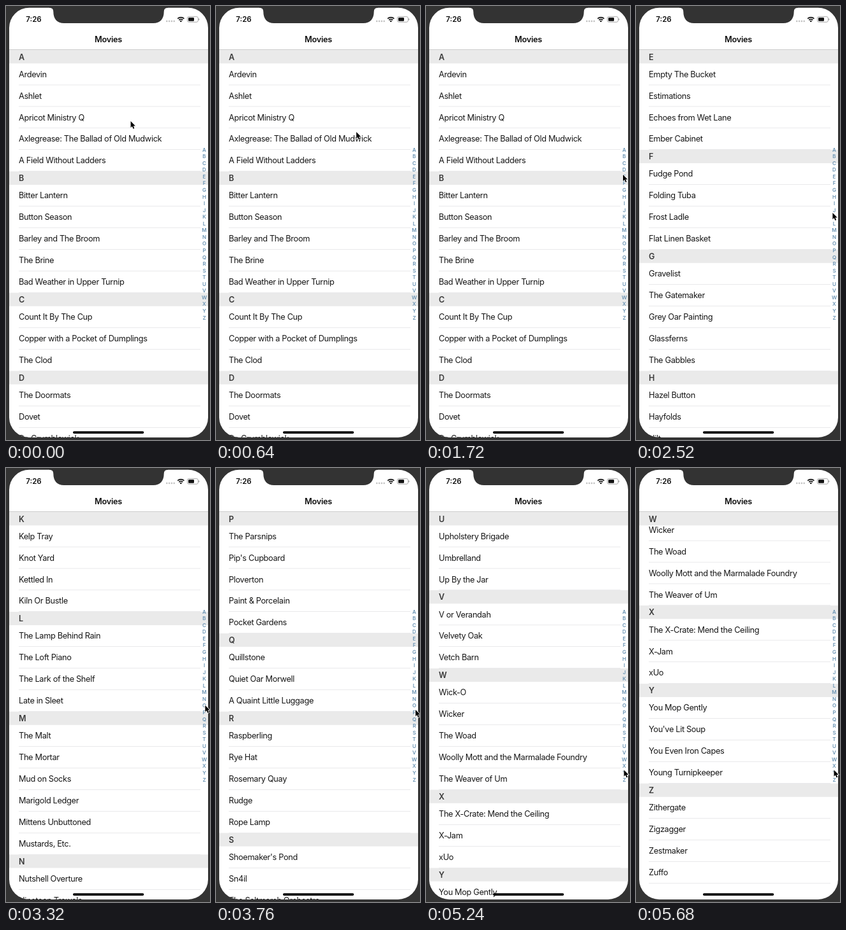
These frames come from a looping animation (320x682 px, 5.72 s). An HTML page with a canvas:

```html
<!DOCTYPE html>
<html lang="en">
<head>
<meta charset="utf-8">
<title>Movies</title>
<style>
  html, body { margin: 0; width: 100%; height: 100%; overflow: hidden; background: #333; }
  canvas { display: block; width: 320px; height: 682px; }
</style>
</head>
<body>
<canvas id="stage"></canvas>
<script>
const W = 320, H = 682, LOOP = 5720, STEP = 40;
const LEFT = 5, RIGHT = 317, CEIL = 2.7, BOTTOM = 678;
const TOP = 69.2, HEAD = 21.1, ROW = 33.92;
const FONT = 'Inter, "Liberation Sans", sans-serif';

const movies = `
A|Ardevin|Ashlet|Apricot Ministry Q|Axlegrease: The Ballad of Old Mudwick|A Field Without Ladders
B|Bitter Lantern|Button Season|Barley and The Broom|The Brine|Bad Weather in Upper Turnip
C|Count It By The Cup|Copper with a Pocket of Dumplings|The Clod
D|The Doormats|Dovet|Dr. Crumblewick
E|Empty The Bucket|Estimations|Echoes from Wet Lane|Ember Cabinet
F|Fudge Pond|Folding Tuba|Frost Ladle|Flat Linen Basket
G|Gravelist|The Gatemaker|Grey Oar Painting|Glassferns|The Gabbles
H|Hazel Button|Hayfolds|Hilt
K|Kelp Tray|Knot Yard|Kettled In|Kiln Or Bustle
L|The Lamp Behind Rain|The Loft Piano|The Lark of the Shelf|Late in Sleet
M|The Malt|The Mortar|Mud on Socks|Marigold Ledger|Mittens Unbuttoned|Mustards, Etc.
N|Nutshell Overture|Nineteen Trowels
P|The Parsnips|Pip's Cupboard|Ploverton|Paint & Porcelain|Pocket Gardens
Q|Quillstone|Quiet Oar Morwell|A Quaint Little Luggage
R|Raspberling|Rye Hat|Rosemary Quay|Rudge|Rope Lamp
S|Shoemaker's Pond|Sn4il|The Saltmarsh Orchestra
U|Upholstery Brigade|Umbrelland|Up By the Jar
V|V or Verandah|Velvety Oak|Vetch Barn
W|Wick-O|Wicker|The Woad|Woolly Mott and the Marmalade Foundry|The Weaver of Um
X|The X-Crate: Mend the Ceiling|X-Jam|xUo
Y|You Mop Gently|You've Lit Soup|You Even Iron Capes|Young Turnipkeeper
Z|Zithergate|Zigzagger|Zestmaker|Zuffo`;

let total = 0;
const sections = movies.trim().split('\n').map(line => {
  const [letter, ...rows] = line.split('|');
  const s = { letter, rows, top: total };
  total += HEAD + rows.length * ROW;
  s.end = total;
  return s;
});
const maxScroll = total - 583.3;

// Index taps: [time, letter]
const taps = [[0, 'A'], [1760, 'E'], [2640, 'K'], [3720, 'P'], [4600, 'U'], [5320, 'Y']];

// Pointer moves: [start, end, x, y]
const start = [195.6, 181];
const moves = [
  [420, 1120, 300.4, 254], [1120, 1480, 309, 265], [2080, 2500, 308.4, 325],
  [3040, 3400, 313, 380], [4080, 4480, 312.6, 432.5], [4690, 5030, 310.5, 474.5]
];

const canvas = document.getElementById('stage');
const ctx = canvas.getContext('2d');
const dpr = window.devicePixelRatio || 1;
canvas.width = W * dpr;
canvas.height = H * dpr;

function rect(color, x, y, w, h) {
  ctx.fillStyle = color;
  ctx.fillRect(x, y, w, h);
}

function pill(color, x, y, w, h, r) {
  ctx.fillStyle = color;
  ctx.beginPath();
  ctx.roundRect(x, y, w, h, r);
  ctx.fill();
}

function text(str, x, y, size, weight, color, align = 'left', spacing = 0) {
  ctx.font = `${weight} ${size}px ${FONT}`;
  ctx.letterSpacing = spacing + 'px';
  ctx.textAlign = align;
  ctx.fillStyle = color;
  ctx.fillText(str, x, y);
}

function scrollAt(t) {
  const letter = taps.filter(tap => tap[0] <= t).pop()[1];
  return Math.min(sections.find(s => s.letter === letter).top, maxScroll);
}

function pointerAt(t) {
  let [x, y] = start;
  for (const [from, to, mx, my] of moves) {
    const u = Math.min(1, Math.max(0, (t - from) / (to - from)));
    const e = u * u * (3 - 2 * u);
    x += (mx - x) * e;
    y += (my - y) * e;
  }
  return [x, y];
}

function drawList(scroll) {
  ctx.save();
  ctx.beginPath();
  ctx.rect(0, TOP, W, H - TOP);
  ctx.clip();
  const visible = sections.filter(s => s.end > scroll && s.top < scroll + H - TOP);
  for (const s of visible) {
    s.rows.forEach((title, i) => {
      const y = TOP + s.top - scroll + HEAD + i * ROW;
      text(title, 20, y + 21.4, 12.8, 400, '#181818', 'left', -0.36);
      rect('#c8c8cc', 20, y + ROW - 0.4, 285, 0.4);
    });
  }
  // The current header sticks to the top
  for (const s of visible) {
    const y = TOP + Math.min(Math.max(s.top - scroll, 0), s.end - scroll - HEAD);
    rect('#eaeaea', LEFT, y, RIGHT - LEFT, HEAD);
    text(s.letter, 20, y + 15.3, 12.5, 600, '#3a3a3a');
  }
  ctx.restore();
}

function drawIndex() {
  for (let i = 0; i < 26; i++) {
    text(String.fromCharCode(65 + i), 311, 228.6 + i * 10.56, 8, 600, '#6993b3', 'center');
  }
}

function drawStatus() {
  text('7:26', 43.5, 25.2, 11.5, 600, '#111', 'center');
  for (let i = 0; i < 4; i++) pill('#c4c4c4', 251 + i * 3.8, 22.6, 2.6, 2.6, 1.3);

  ctx.strokeStyle = '#111';
  ctx.lineWidth = 1.7;
  for (const r of [4.2, 7.2]) {
    ctx.beginPath();
    ctx.arc(274.3, 25, r, -Math.PI * 0.75, -Math.PI * 0.25);
    ctx.stroke();
  }
  ctx.fillStyle = '#111';
  ctx.beginPath();
  ctx.moveTo(274.3, 25.4);
  ctx.arc(274.3, 25.4, 2.6, -Math.PI * 0.75, -Math.PI * 0.25);
  ctx.fill();

  ctx.strokeStyle = '#a0a0a0';
  ctx.lineWidth = 0.9;
  ctx.beginPath();
  ctx.roundRect(284.5, 16.7, 16.8, 8.6, 2.4);
  ctx.stroke();
  pill('#111', 286, 18.2, 9, 5.6, 1.2);
  pill('#a0a0a0', 302, 19.6, 1.2, 2.8, 0.6);
}

function drawNotch() {
  ctx.fillStyle = '#333';
  ctx.beginPath();
  ctx.moveTo(68, 0);
  ctx.lineTo(68, CEIL);
  ctx.quadraticCurveTo(74.3, CEIL, 74.3, 9);
  ctx.bezierCurveTo(74.3, 20, 80, 27, 91, 27);
  ctx.lineTo(231, 27);
  ctx.bezierCurveTo(242, 27, 247.7, 20, 247.7, 9);
  ctx.quadraticCurveTo(247.7, CEIL, 254, CEIL);
  ctx.lineTo(254, 0);
  ctx.fill();
}

function drawPointer(x, y) {
  ctx.save();
  ctx.translate(x, y);
  ctx.beginPath();
  [[0, 0], [0, 10.2], [2.3, 8.1], [4, 12], [5.8, 11.2], [4.1, 7.4], [7.3, 7.4]]
    .forEach(p => ctx.lineTo(...p));
  ctx.closePath();
  ctx.lineJoin = 'round';
  ctx.lineWidth = 1.5;
  ctx.strokeStyle = '#fff';
  ctx.stroke();
  ctx.fillStyle = '#000';
  ctx.fill();
  ctx.restore();
}

function draw(t) {
  ctx.setTransform(dpr, 0, 0, dpr, 0, 0);
  rect('#333', 0, 0, W, H);

  ctx.save();
  ctx.beginPath();
  ctx.roundRect(LEFT, CEIL, RIGHT - LEFT, BOTTOM - CEIL, 31.5);
  ctx.clip();
  rect('#fff', 0, 0, W, H);
  drawList(scrollAt(t));
  rect('#c4c4c4', LEFT, 68.2, RIGHT - LEFT, 1);
  text('Movies', 160.5, 56.6, 12.8, 600, '#111', 'center', -0.3);
  drawStatus();
  drawIndex();
  pill('#000', 105, 668.2, 111.3, 3.8, 1.9);
  ctx.restore();

  drawNotch();
  drawPointer(...pointerAt(t));
}

const began = performance.now();
function tick() {
  const t = (performance.now() - began) % LOOP;
  draw(Math.floor(t / STEP) * STEP);
  requestAnimationFrame(tick);
}
tick();
</script>
</body>
</html>
```
